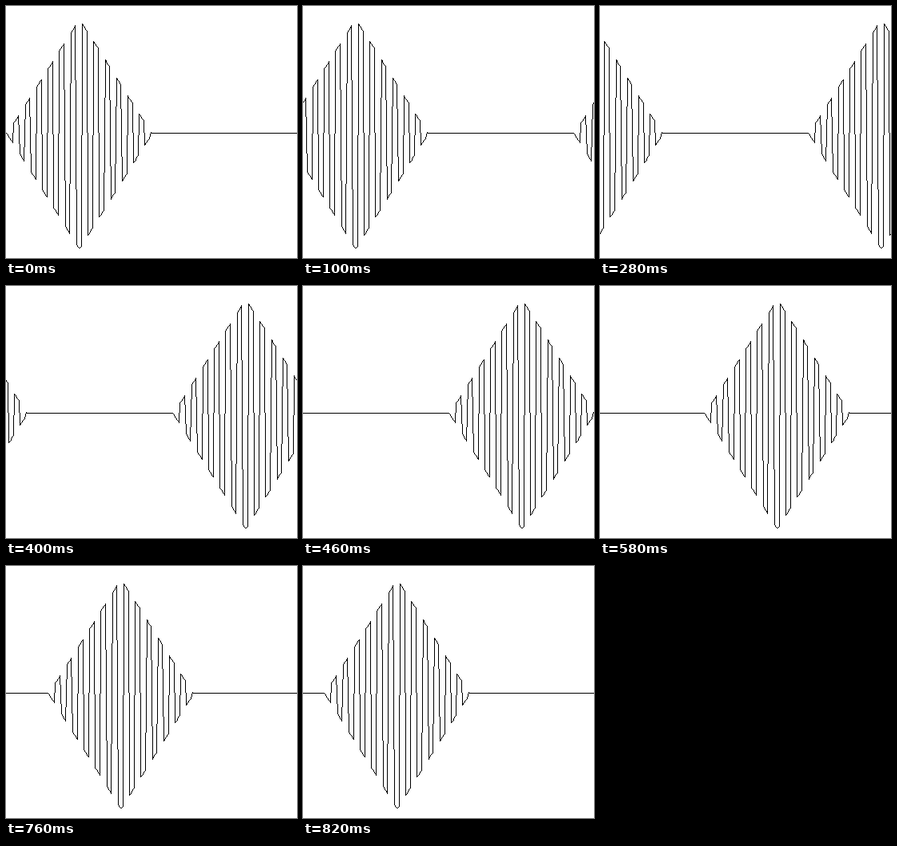
Recreate the animation shown at these times as a matplotlib script. Size 364 by 316 pixels, loop 0.88 s.

```python
import numpy as np
import matplotlib.pyplot as plt
from matplotlib.animation import FuncAnimation

W, H = 364, 316
SAMPLES = 256
PITCH = 1.4255            # pixels per sample
BASE, MID = 159, 160      # rest line and centre of the burst
GAIN = 2.267              # envelope growth per sample
TICK, TICKS = 20, 44
STEP = 26                 # scroll distance in pixels


def signal(i):
    """Square wave under a triangular envelope, then silence."""
    if not 1 <= i < SAMPLES // 2:
        return BASE
    env = GAIN * min(i - 1, SAMPLES // 2 - i)
    sign = 1 if (i - 2) // 5 % 2 == 0 else -1
    return round(MID + sign * env)


def draw_line(img, x0, y0, x1, y1):
    n = max(abs(x1 - x0), abs(y1 - y0), 1)
    t = np.arange(n + 1) / n
    xs = np.floor(x0 + (x1 - x0) * t + 0.5).astype(int)
    ys = np.floor(y0 + (y1 - y0) * t + 0.5).astype(int)
    img[ys, xs] = 0


def draw_wave():
    img = np.ones((H, W))
    pts = [(int(i * PITCH), signal(i)) for i in range(SAMPLES)]
    for a, b in zip(pts, pts[1:]):
        draw_line(img, *a, *b)
    return img


wave = draw_wave()

fig = plt.figure(figsize=(W / 100, H / 100), dpi=100, facecolor="white")
ax = fig.add_axes([0, 0, 1, 1])
ax.axis("off")
view = ax.imshow(wave, cmap="gray", vmin=0, vmax=1,
                 interpolation="nearest", aspect="auto")


def update(tick):
    # the first pose holds for five ticks, the others for three
    pose = max(0, (tick - 2) // 3)
    view.set_data(np.roll(wave, -STEP * pose, axis=1))
    return [view]


anim = FuncAnimation(fig, update, frames=TICKS, interval=TICK,
                     repeat=True, repeat_delay=0, blit=False)
plt.show()
```
